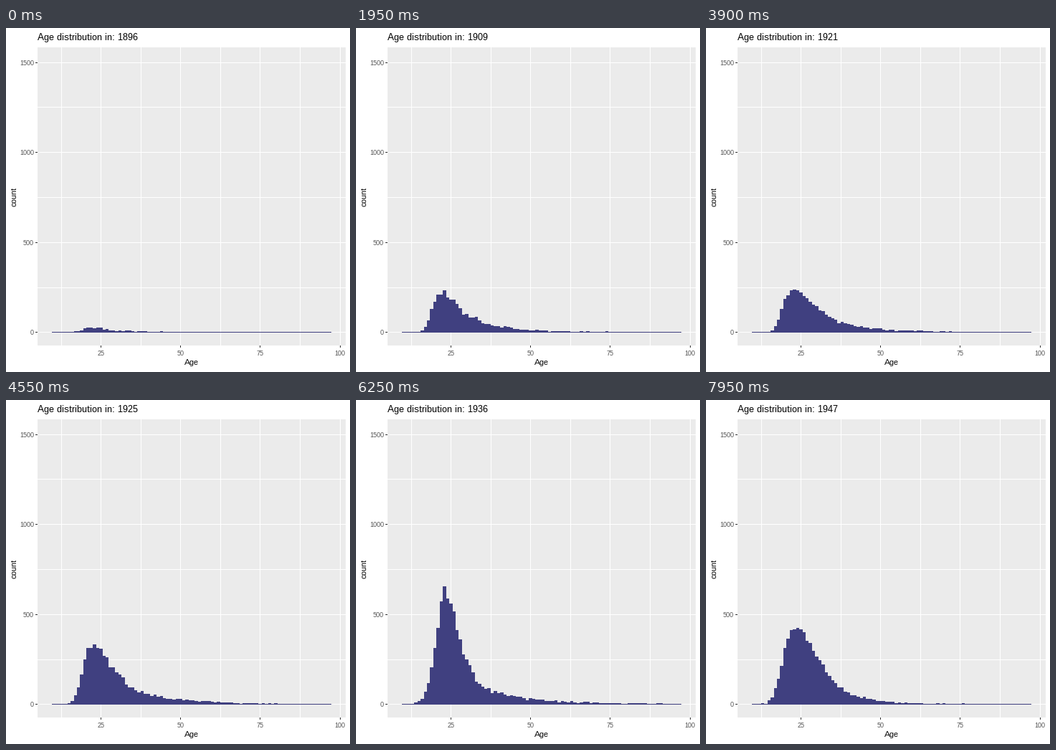
These frames come from a looping animation (480 by 480 pixels, 8 s). A matplotlib script:

```python
import numpy as np
import matplotlib.pyplot as plt
from matplotlib.animation import FuncAnimation

SIZE, DPI = 480, 100
FRAMES, INTERVAL = 160, 50
START, RATE = 1896, 120 / 374          # years per frame
PX = 72 / DPI                          # one pixel in points
INK, TICK, TEXT = "#404080", "#333333", "#4D4D4D"

LEFT, TOP, WIDTH, HEIGHT = 44, 27, 430, 416      # panel in pixels
X0, X_SPAN = 5.11, 96.8
Y0, Y_SPAN = -74.5, 1656.7

plt.rcParams.update({
    "font.family": "Liberation Sans",
    "text.hinting": "native",
    "text.hinting_factor": 1,
})

ages = np.arange(10, 98)
rng = np.random.default_rng(7)


def shape(mode, rise, power, fall, share, decay):
    """Unit-height age curve: steep rise, bell-shaped fall, exponential tail."""
    d = np.abs(ages - mode)
    young = np.exp(-(d / rise) ** power)
    old = (1 - share) * np.exp(-(d / fall) ** 2) + share * np.exp(-d / decay)
    return np.where(ages < mode, young, old)


def sample(curve):
    """Counting noise that grows with the square root of the count."""
    noise = 0.9 * np.sqrt(curve) * rng.standard_normal(len(ages))
    return np.clip(curve + noise, 0, None)


early = shape(mode=23, rise=4.5, power=2.6, fall=5.1, share=0.77, decay=10)
mid = shape(mode=24, rise=5.9, power=4.0, fall=10, share=0.6, decay=12)
twenties = shape(mode=23, rise=4.6, power=2.6, fall=8, share=0.6, decay=13)
thirties = shape(mode=24, rise=5.4, power=2.6, fall=3.2, share=0.55, decay=18)
prewar = shape(mode=23, rise=3.7, power=1.7, fall=6, share=0.32, decay=14)
postwar = shape(mode=23, rise=4.85, power=2.3, fall=11, share=0.35, decay=12)

games = {
    1896: 27 * early,
    1900: 98 * early,
    1904: 88 * early,
    1906: 84 * early,
    1908: 218 * early,
    1912: 165 * early + 132 * mid,
    1920: 208 * mid,
    1924: 320 * twenties,
    1928: 353 * twenties,
    1932: 203 * thirties,
    1936: 635 * prewar,
    1948: 425 * postwar,
}
stops = [round((year - START) / RATE) for year in games]
counts = [sample(curve) for curve in games.values()]


def heights(i):
    k = np.searchsorted(stops, i, side="right") - 1
    w = (i - stops[k]) / (stops[k + 1] - stops[k])
    return (1 - w) * counts[k] + w * counts[k + 1]


def px_x(v):
    return LEFT + (v - X0) * WIDTH / X_SPAN


def px_y(v):
    return TOP + HEIGHT - (v - Y0) * HEIGHT / Y_SPAN


fig = plt.figure(figsize=(SIZE / DPI, SIZE / DPI), dpi=DPI, facecolor="white")
ax = fig.add_axes([LEFT / SIZE, 1 - (TOP + HEIGHT) / SIZE,
                   WIDTH / SIZE, HEIGHT / SIZE], facecolor="#EBEBEB")
ax.set_xticks([])
ax.set_yticks([])
ax.spines[:].set_visible(False)


def label(x, y, s, size, color="black", **kw):
    return fig.text(x / SIZE, 1 - y / SIZE, s, fontsize=size * PX,
                    color=color, **kw)


def mark(x, y, w, h):
    fig.add_artist(plt.Rectangle((x / SIZE, 1 - (y + h) / SIZE), w / SIZE,
                                 h / SIZE, color=TICK, lw=0, aa=False))


line = dict(color="white", lw=PX, aa=False, zorder=1)
for v in np.arange(12.5, 101, 12.5):
    ax.axvline(v, **line)
for v in range(0, 1501, 250):
    ax.axhline(v, **line)

for v in range(25, 101, 25):
    mark(round(px_x(v)), TOP + HEIGHT, 1, 3)
    label(px_x(v), 457, v, 9, TEXT, ha="center")
for v in range(0, 1501, 500):
    mark(LEFT - 3, round(px_y(v)), 3, 1)
    label(39, round(px_y(v)) + 4, v, 9, TEXT, ha="right")

label(259, 470, "Age", 11, ha="center")
label(16, 235.5, "count", 11, rotation=90, ha="right", va="center")
title = label(LEFT, 17, "", 13)

# The outline adds a pixel, so each bar is drawn one pixel narrower.
bars = ax.bar(ages - 0.5, np.zeros(len(ages)), align="edge",
              width=1 - X_SPAN / WIDTH, color=INK, edgecolor=INK,
              lw=PX, aa=False, zorder=3)
ax.set_xlim(X0, X0 + X_SPAN)
ax.set_ylim(Y0, Y0 + Y_SPAN)


def draw(i):
    title.set_text(f"Age distribution in: {round(START + i * RATE)}")
    for bar, h in zip(bars, heights(i)):
        bar.set_height(h)
    return [title, *bars]


anim = FuncAnimation(fig, draw, frames=FRAMES, interval=INTERVAL,
                     repeat=True, repeat_delay=0, blit=False)
plt.show()
```
